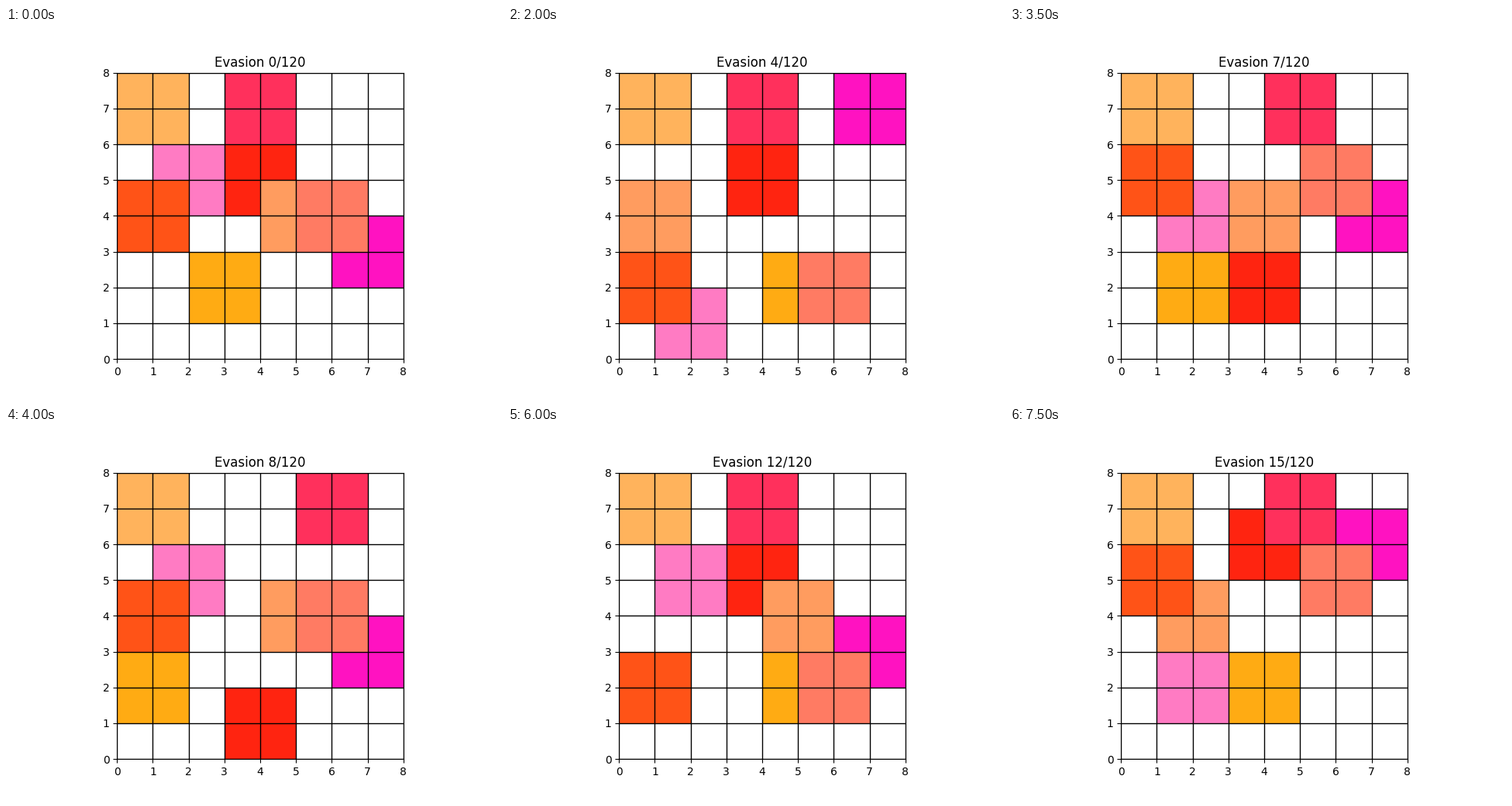
Write a matplotlib script that moves like this. It is 640x480 px and loops after 8 s.

```python
import matplotlib.pyplot as plt
import numpy as np
from matplotlib.animation import FuncAnimation
from matplotlib.colors import to_rgb

SIZE = 8
STEPS = 16
TOTAL = 120

# (colour, axis of travel, fixed coordinate, lowest position, travel, phase),
# painted in this order: shorter travel lies on top
BLOCKS = [
    ("#ff2410", "y", 3, 0, 6, 4),
    ("#ff9c5f", "x", 3, 0, 6, 8),
    ("#ff12c1", "y", 6, 0, 6, 2),
    ("#ff7bc3", "y", 1, 0, 6, 8),
    ("#ffab13", "x", 1, 0, 5, 2),
    ("#ff7b63", "y", 5, 0, 4, 5),
    ("#ff5317", "y", 0, 0, 4, 5),
    ("#ff305c", "x", 6, 2, 3, 1),
    ("#ffb35c", "x", 6, 0, 0, 0),
]


def bounce(step, low, travel, phase):
    """Position of a block going back and forth one cell per step."""
    u = (phase + step) % max(2 * travel, 1)
    return low + travel - abs(travel - u)


def paint(step):
    cells = np.ones((SIZE, SIZE, 3))
    for color, axis, fixed, low, travel, phase in BLOCKS:
        pos = bounce(step, low, travel, phase)
        x, y = (pos, fixed) if axis == "x" else (fixed, pos)
        cells[y:y + 2, x:x + 2] = to_rgb(color)
    return cells


fig, ax = plt.subplots(figsize=(6.4, 4.8), dpi=100)
ax.set_aspect("equal")
edges = np.arange(SIZE + 1)
mesh = ax.pcolormesh(edges, edges, paint(0))
ax.set_xticks(edges)
ax.set_yticks(edges)
ax.grid(color="black", linewidth=1)
title = ax.set_title(f"Evasion 0/{TOTAL}")


def update(step):
    mesh.set_array(paint(step))
    title.set_text(f"Evasion {step}/{TOTAL}")
    return mesh, title


anim = FuncAnimation(fig, update, frames=STEPS, interval=500, repeat=True,
                     repeat_delay=0)
plt.show()
```
